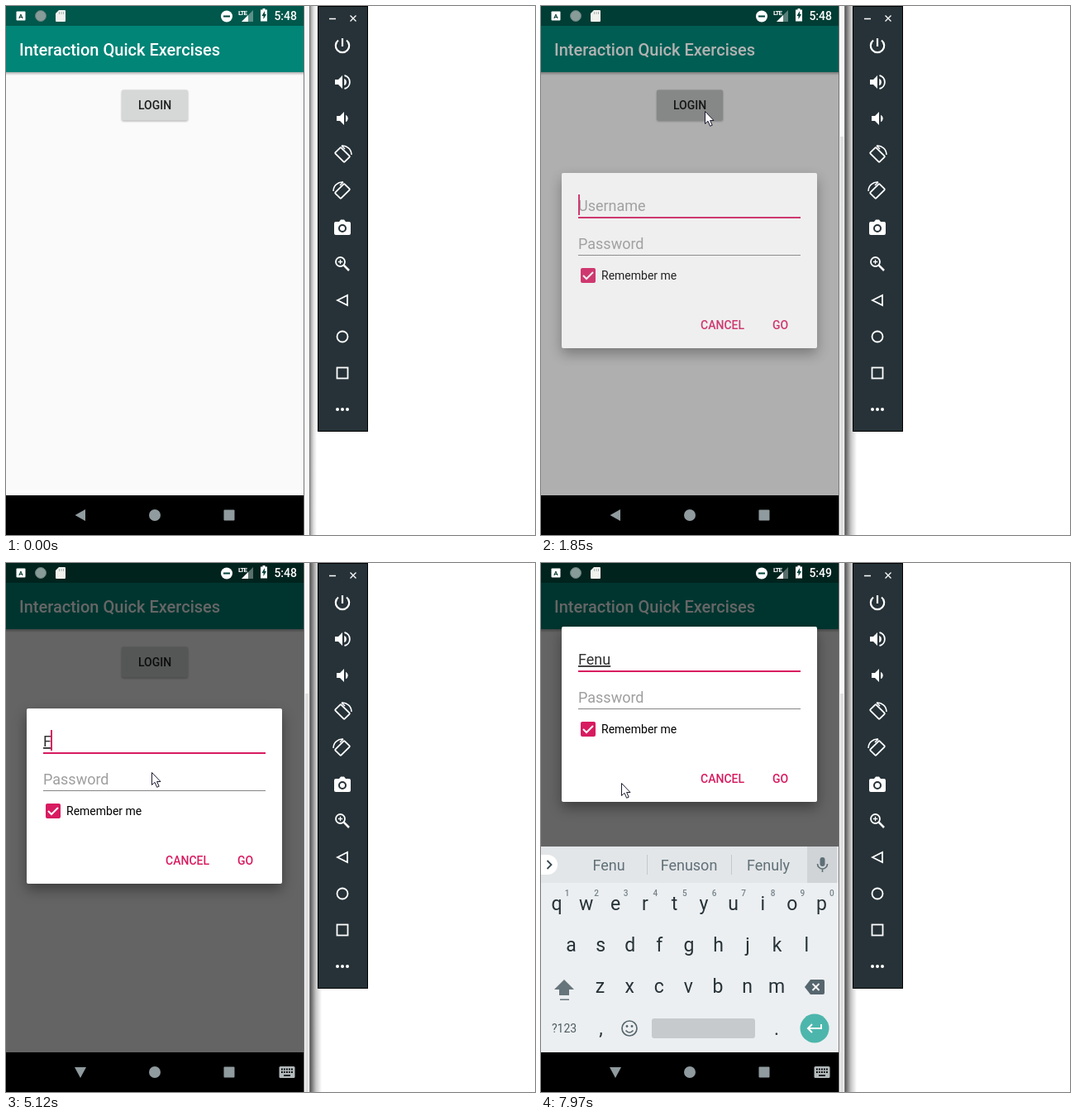
An HTML page that plays this animation: 640x640 px, repeating every 8 s.

```html
<!DOCTYPE html>
<html lang="en">
<head>
<meta charset="utf-8">
<title>Login dialog</title>
<style>
  html, body { margin: 0; width: 100%; height: 100%; overflow: hidden; background: #fff; }
  svg { display: block; width: 100vw; height: 100vh; font-family: Roboto, sans-serif; }
  .medium { font-weight: 500; }
  .line { fill: none; stroke: currentColor; stroke-width: 1.8; }
  .pink { fill: #d81b60; }
  #tools { color: #fff; fill: #fff; }
  #dialogBox { filter: drop-shadow(0 7px 8px rgba(0, 0, 0, .38)); }
  #entry { text-decoration: underline; fill: #303030; }
  #keys { font-size: 23px; fill: #263238; text-anchor: middle; }
  #keys .digit { font-size: 10px; font-weight: 500; fill: #75838a; }
  #words { font-size: 18px; fill: #607078; text-anchor: middle; }
</style>
</head>
<body>
<svg viewBox="0 0 640 640">
  <defs>
    <linearGradient id="edge">
      <stop offset="0" stop-color="#000" stop-opacity=".65"/>
      <stop offset=".5" stop-color="#000" stop-opacity=".22"/>
      <stop offset="1" stop-color="#000" stop-opacity="0"/>
    </linearGradient>
    <linearGradient id="below" x2="0" y2="1">
      <stop stop-opacity=".3"/>
      <stop offset="1" stop-opacity="0"/>
    </linearGradient>
  </defs>
  <rect width="640" height="640" fill="#fff"/>

  <!-- emulator window edge -->
  <rect x="361" width="6" height="640" fill="#f8f8f8"/>
  <rect id="strip" x="362" y="158" width="4" height="482" fill="#dfdfdf"/>
  <path d="M360.5 0V640M367.5 0V640" stroke="#777"/>
  <rect id="shade" x="368" height="640" fill="url(#edge)"/>

  <!-- emulator tool strip -->
  <rect x="377.5" y=".5" width="60" height="514" fill="#263238" stroke="#000"/>
  <g id="tools">
    <path class="line" style="stroke-width:1.3" d="M391 15.500h8M416.500 11.500l7 7m0-7l-7 7"/>
    <path class="line" style="stroke-width:2.2" transform="translate(407 48)" d="M-5-6.500A8.200 8.200 0 1 0 5-6.500M0-9V1"/>
    <g transform="translate(407 92)">
      <path d="M-9-3h4l5-5v16l-5-5h-4zM2.200-4.300a4.700 4.700 0 0 1 0 8.600z"/>
      <path class="line" d="M2.500-8a8.200 8.200 0 0 1 0 16"/>
    </g>
    <path transform="translate(407 136)" d="M-7-3h4l5-5v16l-5-5h-4zM4-4.300a4.700 4.700 0 0 1 0 8.600z"/>
    <g id="rotate" class="line" transform="translate(407 180)">
      <rect x="-8" y="-5" width="16" height="10" rx="1" transform="rotate(45)"/>
      <path d="M-1-11A11 11 0 0 1 11 0M-1-11l4 4" style="stroke-width:1.5"/>
    </g>
    <use href="#rotate" transform="matrix(-1 0 0 1 814 44)"/>
    <g transform="translate(407 268)">
      <path d="M-8-7h4l2-2.500h4l2 2.500h4q2 0 2 2v12q0 2-2 2h-16q-2 0-2-2v-12q0-2 2-2z"/>
      <circle cy="1" r="4" stroke="#263238" stroke-width="2"/>
    </g>
    <g class="line" transform="translate(407 312)">
      <circle cx="-2.500" cy="-2.500" r="5.500"/>
      <path d="M-5.200-2.500h5.400M-2.500-5.200v5.400" style="stroke-width:1.3"/>
      <path d="M1.700 1.700L8 8" style="stroke-width:2.5"/>
    </g>
    <path class="line" d="M401 356l12-6v12z"/>
    <circle class="line" cx="407" cy="400" r="6.500"/>
    <rect class="line" x="400.500" y="437.500" width="13" height="13"/>
    <circle cx="401" cy="488" r="2"/><circle cx="407" cy="488" r="2"/><circle cx="413" cy="488" r="2"/>
  </g>

  <!-- app -->
  <rect width="360" height="592" fill="#fafafa"/>
  <rect y="80" width="360" height="4" fill="url(#below)"/>
  <rect width="360" height="80" fill="#008577"/>
  <rect width="360" height="24" fill="#00574b"/>
  <text class="medium" x="16" y="60" font-size="20" fill="#fff">Interaction Quick Exercises</text>
  <rect x="140" y="101.500" width="80" height="37" rx="2" fill="#d6d7d7" style="filter:drop-shadow(0 1px 1px rgba(0,0,0,.3))"/>
  <rect id="press" x="140" y="101.500" width="80" height="37" rx="2"/>
  <text class="medium" x="180" y="125" font-size="14" text-anchor="middle" fill="#1d1f1f">LOGIN</text>
  <rect id="dim" width="360" height="592"/>

  <!-- status bar -->
  <g fill="#fff">
    <rect x="12.500" y="6.500" width="11" height="11" rx="1"/>
    <text x="18" y="15" font-size="8" font-weight="700" text-anchor="middle" fill="#00352e">A</text>
    <circle cx="42" cy="12" r="6.500" fill="#879b98" stroke="#647d79"/>
    <path d="M64 5h7q1 0 1 1v12q0 1-1 1h-10q-1 0-1-1v-9z" fill="#f1f1ee"/>
    <path d="M64.500 7v3m2.500-3v3m2.500-3v3" stroke="#a5b3b0"/>
    <circle cx="267" cy="12.500" r="7"/>
    <rect x="263" y="11.500" width="8" height="2" fill="#00423a"/>
    <text x="281" y="10.500" font-size="8" font-weight="700" textLength="auto" letter-spacing="-1">LTE</text>
    <path d="M299 5v14h-14z" opacity=".35"/>
    <path d="M293 11v8h-8z"/>
    <path d="M310.500 3h3v1.500h2.500v14h-8v-14h2.500z"/>
    <path d="M313 6l-3.500 6h2v4l3.500-6h-2z" fill="#00423a"/>
    <text class="medium" id="clock" x="352" y="17" font-size="14" text-anchor="end"></text>
  </g>

  <!-- dialog -->
  <g id="dialog">
    <rect id="dialogBox" x="25" y="202" width="309" height="212" rx="2" fill="#fff"/>
    <g font-size="18" fill="#9e9e9e">
      <text id="hint" x="45" y="248">Username</text>
      <text id="entry" x="45" y="248"></text>
      <text x="45" y="294">Password</text>
    </g>
    <rect id="caret" class="pink" y="228" width="2" height="25"/>
    <rect class="pink" x="45" y="255" width="269" height="2"/>
    <rect x="45" y="301" width="269" height="1" fill="#858585"/>
    <rect class="pink" x="48" y="317" width="18" height="18" rx="2"/>
    <path d="M51 326l4 4 8-8" fill="none" stroke="#fff" stroke-width="2"/>
    <text x="73" y="331" font-size="14">Remember me</text>
    <g class="medium pink" font-size="14">
      <text x="193" y="391">CANCEL</text>
      <text x="280" y="391">GO</text>
    </g>
  </g>

  <!-- keyboard -->
  <g id="keyboard">
    <rect y="343" width="360" height="249" fill="#eceff1"/>
    <rect y="343" width="360" height="44" fill="#e3e6e8"/>
    <rect x="322" y="343" width="36" height="44" fill="#d0d4d6"/>
    <path d="M0 353h8a12 12 0 0 1 0 24h-8z" fill="#fff"/>
    <path d="M7.500 360l5 5-5 5" fill="none" stroke="#37474f" stroke-width="1.800"/>
    <path d="M128.500 353v24M230.500 353v24" stroke="#c3c8cb"/>
    <rect x="337.500" y="356" width="6" height="11" rx="3" fill="#5f6f77"/>
    <path d="M334.500 364a6 6 0 0 0 12 0M340.500 370v4" fill="none" stroke="#5f6f77" stroke-width="1.600"/>
    <g id="words"><text x="82" y="372"></text><text x="179" y="372"></text><text x="275" y="372"></text></g>
    <g id="keys"></g>
    <path d="M28 504l12 12h-6v7h-12v-7h-6zM23 527.500h11v1.500h-11z" fill="#66757c"/>
    <path d="M326 504h15q2 0 2 2v14q0 2-2 2h-15l-7-9z" fill="#56666e"/>
    <path d="M328.500 509l8 8m0-8l-8 8" stroke="#fff" stroke-width="1.800"/>
    <text x="13" y="568" font-size="14" fill="#4d5c63">?123</text>
    <g fill="none" stroke="#56666e" stroke-width="1.700">
      <circle cx="107" cy="563" r="9"/>
      <path d="M102.500 565.500q4.500 5 9 0"/>
    </g>
    <circle cx="104" cy="560.500" r="1.400" fill="#56666e"/><circle cx="110" cy="560.500" r="1.400" fill="#56666e"/>
    <rect x="134" y="551" width="125" height="24" rx="3" fill="#c6cacc"/>
    <circle cx="331" cy="563" r="17.500" fill="#4db6ac"/>
    <path d="M339 558v5h-16m5-5l-5 5 5 5" fill="none" stroke="#fff" stroke-width="2"/>
  </g>

  <!-- navigation bar -->
  <rect y="592" width="360" height="48" fill="#000"/>
  <g fill="#8f9b9e">
    <path id="back"/>
    <circle cx="180" cy="616" r="7"/>
    <rect x="263.500" y="609.500" width="13" height="13" rx="1"/>
    <g id="imeIcon">
      <rect x="330.500" y="609" width="19" height="14" rx="1.500" fill="#b3babc"/>
      <path d="M333 612.500h15M333 616h15" stroke="#000" stroke-width="1.800" stroke-dasharray="1.800 1.200"/>
      <path d="M336 620h8" stroke="#000" stroke-width="1.600"/>
    </g>
  </g>

  <path id="cursor" d="M.5.500v15l3.500-3.200 2.600 6 2.600-1.100-2.600-5.700h4.400z" fill="#fff" stroke="#1d1d33"/>
</svg>

<script>
const LOOP = 8000;
const el = id => document.getElementById(id);

// Spreads values evenly over a time span, first and last included.
const spread = (start, end, values) =>
  values.map((v, i) => [start + (end - start) * i / (values.length - 1), v]);

// Value of the latest key that has been reached.
const hold = (keys, t) => {
  let value = keys[0][1];
  for (const [time, v] of keys) if (time <= t + 1) value = v;
  return value;
};

const cursorKeys = [
  [0, null],
  ...spread(190, 970, [[387, 570], [352, 470], [310, 370], [268, 280], [236, 212], [214, 164], [202, 138], [198, 127]]),
  ...spread(2720, 3040, [[198, 145], [194, 180], [181, 215], [169, 235]]),
  ...spread(3270, 3380, [[169, 237], [169, 239]]),
  ...spread(3580, 3920, [[171, 243], [173, 247], [175, 251], [176, 253]]),
  ...spread(7530, 7970, [[170, 254], [150, 258], [125, 262], [105, 265], [97, 266]])
];
const pressKeys = [[0, 0], ...spread(1400, 2060, [.04, .08, .1, .1, .1, .05, 0])];
const dimKeys = [[0, 0], ...spread(1730, 2170, [.08, .3, .48, .57, .6])];
const fadeKeys = [[0, 0], ...spread(1730, 2060, [.44, .8, .96, 1])];
const dialogKeys = [[0, 0], ...spread(5120, 5440, [-26, -90, -118, -125])];
const keyboardKeys = [[0, null], ...spread(5227, 5440, [45, 10, 0])];
const caretKeys = [
  [0, 1], [2170, 0], [2720, 1], [3270, 0], [3806, 1], [4240, 0], [4670, 1],
  [5660, 0], [5780, 1], [6330, 0], [6760, 1], [7530, 0]
];
const entryKeys = [[0, ''], [5120, 'F'], [5780, 'Fe'], [6870, 'Fen'], [6980, 'Fenu']];
const suggestions = {
  '': ['', '', ''],
  F: ['F', 'For', 'Fee'],
  Fe: ['Fe', 'Fenu', 'Fee'],
  Fen: ['Fen', 'Fenu', 'Fenuson'],
  Fenu: ['Fenu', 'Fenuson', 'Fenuly']
};

function addKey(label, x, y, className = '') {
  const key = document.createElementNS('http://www.w3.org/2000/svg', 'text');
  key.setAttribute('x', x);
  key.setAttribute('y', y);
  key.setAttribute('class', className);
  key.textContent = label;
  el('keys').append(key);
}

const PITCH = 35.6;
[['qwertyuiop', 19, 420], ['asdfghjkl', 36.5, 470], ['zxcvbnm', 71.5, 520]].forEach(([row, x, y]) =>
  [...row].forEach((letter, i) => addKey(letter, x + PITCH * i, y)));
[...'1234567890'].forEach((digit, i) => addKey(digit, 31.5 + PITCH * i, 403, 'digit'));
addKey(',', 72.5, 571);
addKey('.', 285, 571);

const show = (id, on) => el(id).setAttribute('visibility', on ? 'visible' : 'hidden');
const move = (id, x, y) => el(id).setAttribute('transform', `translate(${x} ${y})`);

function draw(t) {
  const focused = t >= 1400;
  show('strip', focused);
  el('shade').setAttribute('width', focused ? 14 : 8);
  el('shade').setAttribute('opacity', focused ? 1 : .6);

  el('press').setAttribute('opacity', hold(pressKeys, t));
  el('dim').setAttribute('opacity', hold(dimKeys, t));
  el('clock').textContent = t < 5780 ? '5:48' : '5:49';

  const entry = hold(entryKeys, t);
  el('dialog').setAttribute('opacity', hold(fadeKeys, t));
  move('dialog', 0, hold(dialogKeys, t));
  show('hint', !entry);
  el('entry').textContent = entry;
  const width = entry ? el('entry').getComputedTextLength() : 0;
  el('caret').setAttribute('x', Math.max(45, Math.round(44 + width)));
  show('caret', hold(caretKeys, t));

  const slide = hold(keyboardKeys, t);
  show('keyboard', slide !== null);
  move('keyboard', 0, slide || 0);
  [...el('words').children].forEach((word, i) => {
    word.textContent = suggestions[entry][i];
    word.setAttribute('font-weight', i === 1 && entry !== 'Fenu' ? 700 : 400);
  });

  const typing = t >= 5120;
  el('back').setAttribute('d', typing ? 'M83 610h14l-7 13z' : 'M83.500 616l12.500-7v14z');
  show('imeIcon', typing);

  const tip = hold(cursorKeys, t);
  show('cursor', tip);
  if (tip) move('cursor', ...tip);
}

function frame() {
  draw(performance.now() % LOOP);
  requestAnimationFrame(frame);
}
frame();
</script>
</body>
</html>
```
